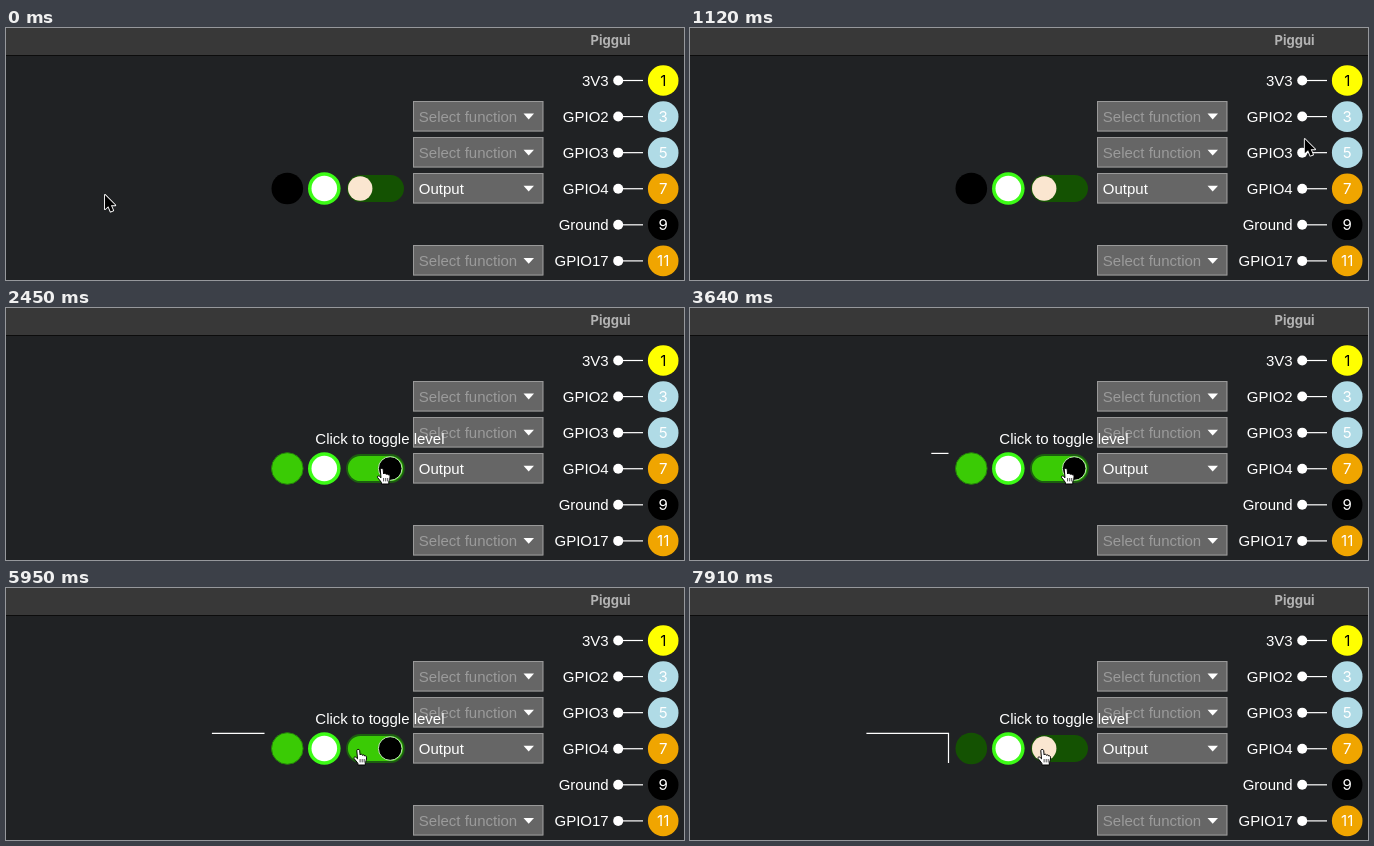
Write an HTML page with a canvas that moves like this. It is 678 px wide and 252 px high and loops after 8000 ms.

```html
<!DOCTYPE html>
<html lang="en">
<head>
<meta charset="utf-8">
<title>Piggui</title>
<style>
  html, body { margin: 0; width: 100%; height: 100%; overflow: hidden; background: #202224; }
  canvas { display: block; width: 678px; height: 252px; }
</style>
</head>
<body>
<canvas id="stage" width="678" height="252"></canvas>
<script>
const ctx = document.getElementById('stage').getContext('2d');
const LOOP = 8000, TICK = 70;
const FONT = '15px "Liberation Sans", Arial, sans-serif';
const DIGITS = '15px Inter, sans-serif';
const GREEN = '#3acb05', DARK = '#145202';

// Ticks at which the level switches and the click ring shows
const ON = 35, OFF = 113;
const CLICKS = [[19, 21], [93, 94]];

// Pointer moves: start tick, end tick, x, y
const MOVES = [
  [0, 1, 82, 168], [1, 6, 354, 167], [9, 10, 353, 166],
  [10, 15, 659, 102], [15, 19, 376, 160], [59, 61, 377, 161],
  [64, 69, 354, 164], [70, 74, 352.5, 161]
];

// Ticks between successive chart samples
const GAPS = [6, 6, 5, 6, 5, 6, 5, 5, 6, 5, 6, 6, 5, 6];

const PINS = [
  { n: 1, name: '3V3', fill: '#ffff00', ink: '#000' },
  { n: 3, name: 'GPIO2', fill: '#b0dbe6', pick: 'Select function' },
  { n: 5, name: 'GPIO3', fill: '#b0dbe6', pick: 'Select function' },
  { n: 7, name: 'GPIO4', fill: '#f0a500', pick: 'Output', set: true },
  { n: 9, name: 'Ground', fill: '#000' },
  { n: 11, name: 'GPIO17', fill: '#f0a500', pick: 'Select function' }
];

function disc(x, y, r, fill, edge, width = 1) {
  ctx.beginPath();
  ctx.arc(x, y, r, 0, Math.PI * 2);
  if (fill) { ctx.fillStyle = fill; ctx.fill(); }
  if (edge) { ctx.strokeStyle = edge; ctx.lineWidth = width; ctx.stroke(); }
}

function label(str, x, y, color, align = 'left', font = FONT) {
  ctx.font = font;
  ctx.textAlign = align;
  ctx.fillStyle = color;
  ctx.fillText(str, x, y);
}

function polyline(points, color, width) {
  ctx.beginPath();
  points.forEach(([x, y]) => ctx.lineTo(x, y));
  ctx.strokeStyle = color;
  ctx.lineWidth = width;
  ctx.stroke();
}

function drawWindow() {
  ctx.fillStyle = '#202224';
  ctx.fillRect(0, 0, 678, 252);
  ctx.fillStyle = '#383838';
  ctx.fillRect(0, 0, 678, 27);
  ctx.fillStyle = '#0c0c0c';
  ctx.fillRect(0, 27, 678, 1);
  label('Piggui', 604.5, 17.2, '#b3b3b3', 'center', 'bold 13px Inter, sans-serif');
}

function drawPick(pin, y) {
  const top = Math.floor(y - 15);
  ctx.fillStyle = '#666';
  ctx.fillRect(407, top, 130.4, 30.5);
  ctx.strokeStyle = '#999';
  ctx.lineWidth = 1;
  ctx.strokeRect(407.5, top + 0.5, 129.4, 29.5);
  label(pin.pick, 412.8, y + 5.4, pin.set ? '#fff' : '#9b9b9b');
  ctx.beginPath();
  ctx.moveTo(517.5, y - 3);
  ctx.lineTo(528, y - 3);
  ctx.lineTo(522.7, y + 2.8);
  ctx.fillStyle = '#fff';
  ctx.fill();
}

function drawPins() {
  PINS.forEach((pin, i) => {
    const y = 52.5 + i * 36.08;
    if (pin.pick) drawPick(pin, y);
    label(pin.name, 602.7, y + 5.4, '#fff', 'right');
    polyline([[612, y], [637, y]], '#fff', 1.2);
    disc(612.2, y, 5, '#fff');
    disc(657.2, y, 15.3, pin.fill);
    label(pin.n, 657.2, y + 5.4, pin.ink || '#fff', 'center', DIGITS);
  });
}

function drawLevel(tick) {
  const on = tick >= ON && tick < OFF, y = 160.5;
  disc(281.3, y, 15.8, on ? GREEN : tick < ON ? '#000' : DARK, on ? '#23800a' : null);
  disc(318.3, y, 16.3, '#3cfb16');
  disc(318.3, y, 12.8, '#fff');

  ctx.beginPath();
  ctx.roundRect(341, 147, 57, 27, 13.5);
  ctx.fillStyle = on ? GREEN : DARK;
  ctx.fill();
  if (on) {
    ctx.strokeStyle = '#1c5e10';
    ctx.lineWidth = 1.8;
    ctx.stroke();
    disc(384.2, y, 11.8, '#000', '#bfe8b4', 1);
  } else {
    disc(354.2, y, 12.2, '#fae6d0');
  }
}

function drawChart(tick) {
  if (tick < ON) return;
  let next = ON, n = 0;
  while (n < GAPS.length && tick >= next + GAPS[n]) next += GAPS[n++];
  const points = [[259 - 5.9 * n, 145.4], [258.5, 145.4]];
  if (tick >= OFF) points.push([258.5, 175]);
  if (n) polyline(points, '#fff', 1.2);
}

function pointerAt(tick) {
  let x = 99, y = 167;
  for (const [from, to, tx, ty] of MOVES) {
    if (tick <= from) break;
    const p = Math.min(1, (tick - from) / (to - from));
    const e = p * p * (3 - 2 * p);
    x += (tx - x) * e;
    y += (ty - y) * e;
  }
  return [x, y];
}

const arrow = new Path2D('M0 0V14.2L3.3 11.2L5.6 16.6L8.2 15.5L5.9 10.3H10.3Z');
const hand = new Path2D(
  'M-1.7 1.6C-1.7 0 1 0 1.2 1.6L1.6 6C2 4.9 4 5 4.1 6.4C4.7 5.5 6 5.8 6.2 7' +
  'C7 6.4 8 7 8 8.2C8.1 11 7.5 12 6.8 13.4V16H-.6V14.4C-2 12.6-3 11.2-4.4 9.6' +
  'C-5.2 8.2-3.4 7.4-2.3 8.5L-1 9.8Z');

function drawPointer(tick) {
  const [x, y] = pointerAt(tick);
  const isHand = tick >= 18;
  if (CLICKS.some(([a, b]) => tick >= a && tick < b)) {
    disc(x - 1, y, 31.5, null, 'rgba(128,128,128,.6)', 2);
  }
  ctx.save();
  ctx.translate(x, y);
  ctx.lineJoin = 'round';
  if (isHand) {
    ctx.fillStyle = '#fff';
    ctx.strokeStyle = '#000';
    ctx.lineWidth = 1;
    ctx.fill(hand);
    ctx.stroke(hand);
    for (const fx of [1.6, 3.7, 5.7]) polyline([[fx, 10], [fx, 13.4]], '#000', 0.7);
  } else {
    ctx.fillStyle = '#000';
    ctx.strokeStyle = '#fff';
    ctx.lineWidth = 1.8;
    ctx.stroke(arrow);
    ctx.fill(arrow);
  }
  ctx.restore();
}

function render(ms) {
  const tick = Math.min(OFF, Math.floor((ms % LOOP) / TICK));
  drawWindow();
  drawPins();
  drawLevel(tick);
  drawChart(tick);
  if (tick >= 18) label('Click to toggle level', 309.3, 136, '#fff');
  drawPointer(tick);
}

const start = performance.now();
function loop() {
  render(performance.now() - start);
  requestAnimationFrame(loop);
}
loop();
</script>
</body>
</html>
```
